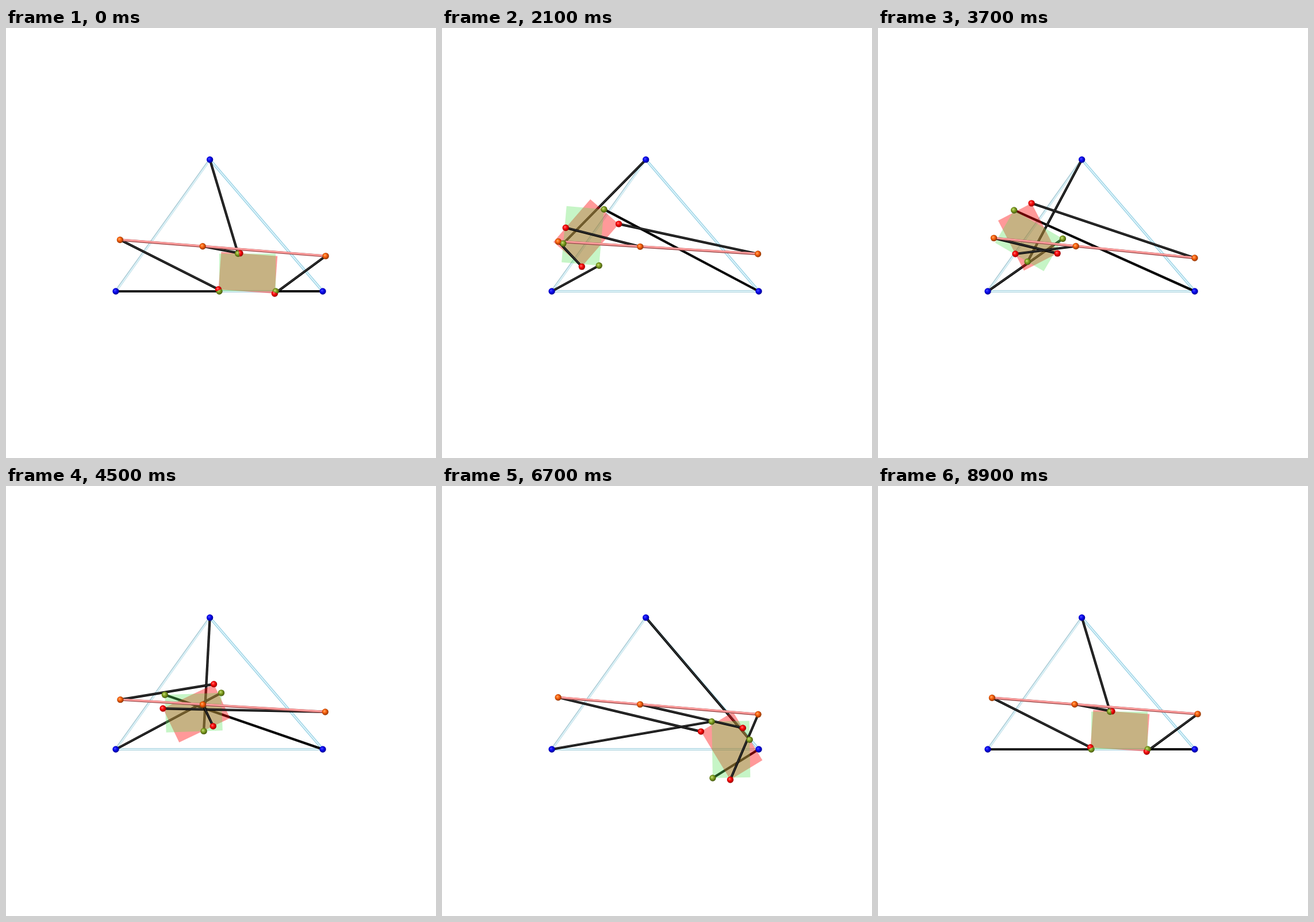
An HTML page with a canvas for the animation above (9 s loop, 748 px wide and 748 px high).

```html
<!DOCTYPE html>
<html lang="en">
<head>
<meta charset="utf-8">
<title>Planar linkage</title>
<style>
html, body { margin: 0; width: 100%; height: 100%; overflow: hidden; background: #fff; }
canvas { display: block; width: 748px; height: 748px; }
</style>
</head>
<body>
<canvas id="stage" width="748" height="748"></canvas>
<script>
const ctx = document.getElementById('stage').getContext('2d');
const UNIT = 360 / 11, ORIGIN = [191, 458], STEPS = 90, STEP_MS = 100, RADIUS = 5.7;

const BASE = [[0, 0], [11, 0], [5, 7]];
const JOINTS = [[0, 0], [3, 0], [1, 2]];
const CORNERS = [[0, 0], [3, 0], [3, 2], [0, 2]];

const add = (a, b) => [a[0] + b[0], a[1] + b[1]];
const sub = (a, b) => [a[0] - b[0], a[1] - b[1]];
const scale = (a, k) => [a[0] * k, a[1] * k];
const rotate = (a, t) => [
  a[0] * Math.cos(t) - a[1] * Math.sin(t),
  a[0] * Math.sin(t) + a[1] * Math.cos(t)
];
const mean = pts => scale(pts.reduce(add), 1 / pts.length);
const toScreen = ([x, y]) => [ORIGIN[0] + x * UNIT, ORIGIN[1] - y * UNIT];

const baseCenter = mean(BASE), jointCenter = mean(JOINTS);
const baseArms = BASE.map(p => sub(p, baseCenter));
const jointArms = JOINTS.map(p => sub(p, jointCenter));

// Project points on their best-fitting line through the centre.
function flatten(pts) {
  let xx = 0, yy = 0, xy = 0;
  for (const [x, y] of pts) { xx += x * x; yy += y * y; xy += x * y; }
  const angle = Math.atan2(2 * xy, xx - yy) / 2;
  return pts.map(p => rotate([rotate(p, -angle)[0], 0], angle));
}

// Rotation that best carries the platform arms onto the given points.
function bestAngle(pts) {
  let re = 0, im = 0;
  pts.forEach(([x, y], i) => {
    const [u, v] = jointArms[i];
    re += x * u + y * v;
    im += y * u - x * v;
  });
  return Math.atan2(im, re);
}

// Closest pose whose base triangle has collapsed to a line.
function closestCollapse(phi) {
  const arms = jointArms.map(a => rotate(a, phi));
  let psi = phi, line;
  for (let i = 0; i < 80; i++) {
    const moved = jointArms.map((a, k) => sub(rotate(a, psi), arms[k]));
    line = flatten(baseArms.map((b, k) => sub(b, scale(moved[k], 0.2))));
    psi = bestAngle(arms.map((a, k) => sub(a, scale(sub(line[k], baseArms[k]), 0.5))));
  }
  return { psi, line: line.map(p => add(p, baseCenter)) };
}

function pose(step) {
  const phi = 2 * Math.PI * step / (STEPS - 1);
  const start = [5.5 - 3 * Math.sin(phi), 1.5 * (1 - Math.cos(phi))];
  const center = add(start, rotate(jointCenter, phi));
  const { psi, line } = closestCollapse(phi);
  const place = (pts, angle) =>
    pts.map(p => toScreen(add(center, rotate(sub(p, jointCenter), angle))));
  return {
    base: BASE.map(toScreen),
    line: line.map(toScreen),
    green: place(JOINTS, phi),
    red: place(JOINTS, psi),
    greenPlate: place(CORNERS, phi),
    redPlate: place(CORNERS, psi)
  };
}

function stroke(a, b, color, width) {
  ctx.strokeStyle = color;
  ctx.lineWidth = width;
  ctx.beginPath();
  ctx.moveTo(...a);
  ctx.lineTo(...b);
  ctx.stroke();
}

// Round bar: dark edge, lighter core shifted by a small offset.
function bar(a, b, edge, core, width, coreWidth, shift = [0, 0]) {
  stroke(a, b, edge, width);
  stroke(add(a, shift), add(b, shift), core, coreWidth);
}

const leg = (a, b, core = '#343434') => bar(a, b, '#060606', core, 4.2, 1.8, [0, -0.3]);

function plate(pts, color) {
  ctx.fillStyle = color;
  ctx.beginPath();
  pts.forEach(p => ctx.lineTo(...p));
  ctx.fill();
}

const SHADES = {
  blue: ['#4848ff', '#0808ee', '#000090'],
  orange: ['#ffa860', '#f9600c', '#8c3200'],
  green: ['#c4dc78', '#81a122', '#43560c'],
  red: ['#ff6c6c', '#fa0808', '#970000']
};

function ball([x, y], shades) {
  const g = ctx.createRadialGradient(x - 1.5, y - 1.6, 0.3, x - 0.5, y - 0.5, RADIUS + 0.6);
  g.addColorStop(0, shades[0]);
  g.addColorStop(0.45, shades[1]);
  g.addColorStop(1, shades[2]);
  ctx.fillStyle = g;
  ctx.beginPath();
  ctx.arc(x, y, RADIUS, 0, 2 * Math.PI);
  ctx.fill();
}

// Spheres at equal depth meet on the line halfway between their centres.
function clipAgainst(a, b) {
  const d = sub(b, a), dist = Math.hypot(...d);
  if (dist < 0.01 || dist > 2 * RADIUS) return;
  ctx.translate(...a);
  ctx.rotate(Math.atan2(d[1], d[0]));
  ctx.beginPath();
  ctx.rect(-20, -20, 20 + dist / 2, 40);
  ctx.clip();
  ctx.rotate(-Math.atan2(d[1], d[0]));
  ctx.translate(-a[0], -a[1]);
}

function balls(groups) {
  const all = groups.flatMap(([pts, name]) => pts.map(at => ({ at, shades: SHADES[name] })));
  for (const one of all) {
    ctx.save();
    for (const other of all) if (other !== one) clipAgainst(one.at, other.at);
    ball(one.at, one.shades);
    ctx.restore();
  }
}

function draw(step) {
  const { base, line, green, red, greenPlate, redPlate } = pose(step);
  ctx.fillStyle = '#fff';
  ctx.fillRect(0, 0, 748, 748);

  bar(base[0], base[1], '#a4cfdb', '#e2f5fa', 4, 2);
  bar(base[0], base[2], '#a6c6d0', '#daf2f8', 4, 2.4, [0.4, 0.3]);
  bar(base[1], base[2], '#8fcde1', '#def4fb', 4.4, 2.2);
  base.forEach((b, i) => leg(b, green[i], i === 1 ? '#060606' : undefined));

  plate(redPlate, 'rgba(255,0,0,0.4)');
  plate(greenPlate, 'rgba(90,226,90,0.34)');

  line.forEach((c, i) => leg(c, red[i]));
  bar(line[0], line[1], '#a05050', '#ff9e9e', 4.4, 2.8, [0, -0.6]);

  balls([[base, 'blue'], [line, 'orange'], [red, 'red'], [green, 'green']]);
}

let shown = -1;
function tick() {
  const step = Math.floor(performance.now() / STEP_MS) % STEPS;
  if (step !== shown) draw(shown = step);
  requestAnimationFrame(tick);
}
tick();
</script>
</body>
</html>
```
